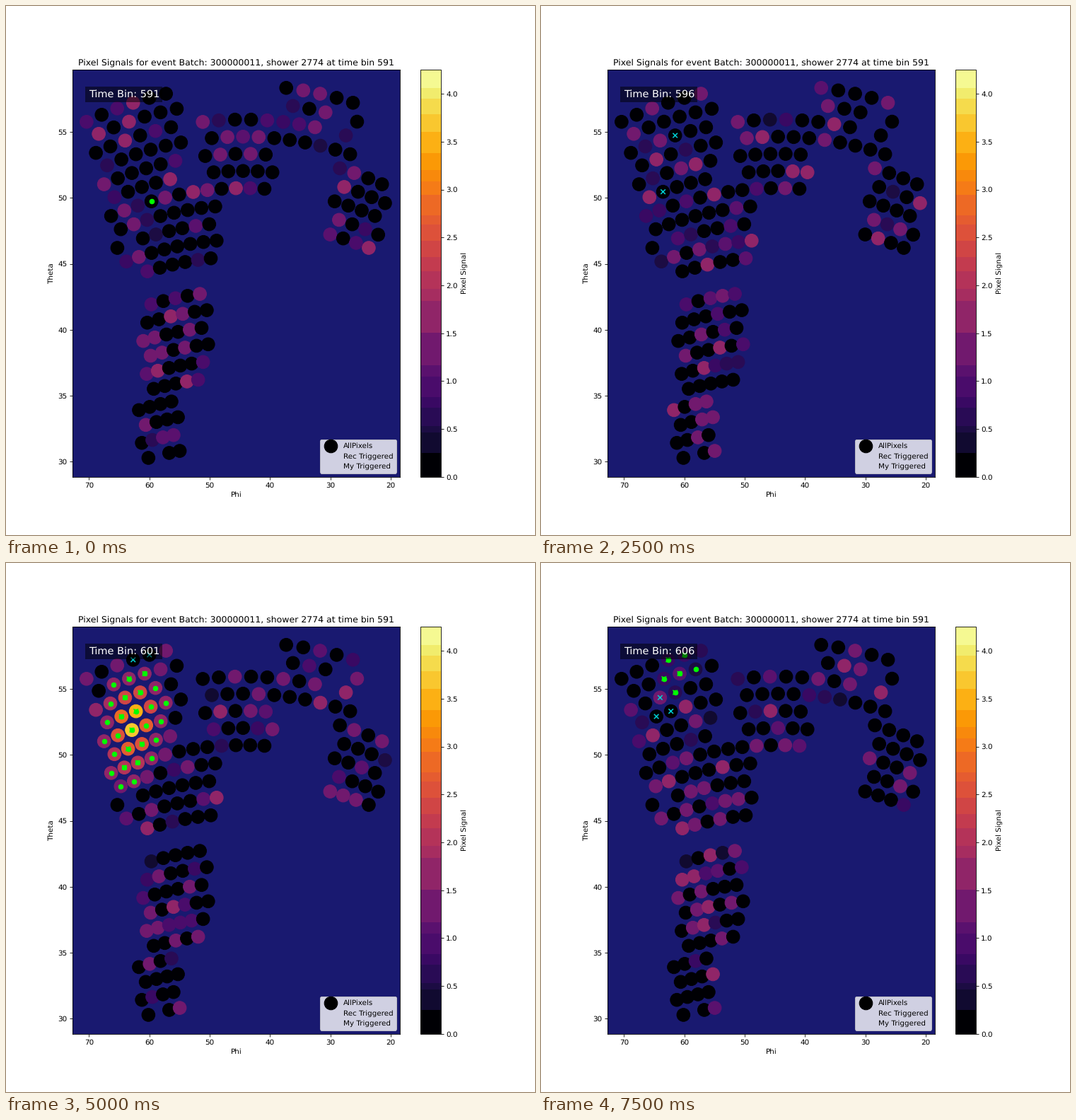
These frames come from a looping animation (748x748 px, 8000 ms). A matplotlib script:

```python
import numpy as np
import matplotlib.pyplot as plt
from matplotlib.animation import FuncAnimation
from matplotlib.colors import ListedColormap

FIRST_BIN, N_BINS = 591, 16
VMAX = 4.254
PITCH = 1.5                    # degrees between neighbouring pixels
TOP_TILT, MID_PHI = 58.53, 44.48

# Filled parts of the hexagonal camera: first row, last row, first col, last col
BLOCKS = [
    (0, 4, 4, 9), (5, 5, 5, 9), (6, 6, -2, 9), (7, 9, 2, 9), (10, 10, 2, 7),
    (12, 12, 3, 7), (13, 16, 3, 8), (17, 17, 4, 8), (18, 21, 6, 9),
    (2, 2, -5, 2), (3, 3, -7, 2), (4, 5, -2, 2),
    (0, 1, -7, -3), (2, 2, -7, -7), (4, 8, -10, -7),
]
GAPS = {(1, -6), (8, 8), (21, 8)}
EARLY_REC = (6, 6)
EARLY_MY = [(2, 6), (4, 8), (5, 8)]


def sky(row, col):
    """Phi and theta of a lattice node; each row lies on a great circle."""
    tilt = np.radians(TOP_TILT - PITCH * np.sqrt(3) / 2 * row)
    a = np.radians(PITCH * (col + np.where(row % 2, 0, .5)))
    theta = np.arcsin(np.sin(tilt) * np.cos(a))
    phi = np.arctan2(np.sin(a), np.cos(a) * np.cos(tilt))
    return MID_PHI + np.degrees(phi), np.degrees(theta)


nodes = [(r, c) for r0, r1, c0, c1 in BLOCKS
         for r in range(r0, r1 + 1) for c in range(c1, c0 - 1, -1)
         if (r, c) not in GAPS]
row, col = np.array(nodes).T
phi, theta = sky(row, col)
points = np.column_stack([phi, theta])
across = phi - (63.38 - .306 * (theta - 50.445))   # distance from the track

is_early_rec = np.array([n == EARLY_REC for n in nodes])
is_early_my = np.array([n in EARLY_MY for n in nodes])
core = (np.abs(across) < 2.145) & (row < 7)


def pulse(b):
    """Signal of the climbing shower and the pixels inside its outline."""
    keys = np.arange(596, 607, 2)
    amp = np.interp(b, keys, [0, 1.9, 4.3, 4.2, 2.7, 1.4])
    mid = np.interp(b, keys, [49, 50.2, 50.8, 53.85, 55.5, 56.5])
    wide = np.interp(b, keys, [1, 1.75, 3.75, 5.86, 4.6, 2.9])
    tall = np.interp(b, keys, [1.5, 2.6, 3.75, 4.1, 3, 2])
    r = np.hypot(across / wide, (theta - mid) / tall)
    return amp * np.exp(-.9 * r), (r < 1.25) & (amp > 1)


def signals(b):
    rng = np.random.default_rng(b)
    n = len(nodes)
    noise = rng.triangular(.25, 1.5, 1.75, n) * (rng.random(n) < .37)
    light, inside = pulse(b)
    return np.where(inside, light * rng.uniform(.94, 1.06, n), noise)


def triggers(b):
    rec = pulse(b)[1] | (is_early_rec & (b < 594))
    start = np.where(is_early_my, 595, np.where(theta > 53.7, 600, 598))
    end = np.where(theta > 52.5, 606, 603)
    return rec, core & (start <= b) & (b <= end)


def stepped_inferno():
    edges = np.array([0, .25, .465, .53, .72, .83, 1.05, 1.165, 1.5, 1.84, 1.96,
                      2.14, 2.29, 2.47, 2.63, 2.73, 2.94, 3.08, 3.21, 3.38,
                      3.61, 3.79, 3.95, 4.06, VMAX])
    mids = (edges[:-1] + edges[1:]) / 2 / VMAX
    mids[0] = 0
    v = (np.arange(512) + .5) / 512 * VMAX
    return ListedColormap(plt.get_cmap("inferno")(mids[np.digitize(v, edges) - 1]))


plt.rcParams["text.hinting"] = "none"
fig, ax = plt.subplots(figsize=(10, 10), dpi=74.8)
ax.set_facecolor("midnightblue")
ax.scatter([], [], s=320, color="black", label="AllPixels")
glow = ax.scatter(phi, theta, s=320, c=signals(FIRST_BIN), cmap=stepped_inferno(),
                  vmin=0, vmax=VMAX)
rec_dots = ax.scatter([], [], s=40, color="none", label="Rec Triggered", zorder=2)
my_marks = ax.scatter([], [], s=40, marker="x", color="none", label="My Triggered",
                      zorder=2)
fig.colorbar(glow, ax=ax, label="Pixel Signal")
ax.legend(loc="lower right")
rec_dots.set_color("lime")

ax.set_xlim(72.81, 18.445)
ax.set_ylim(28.86, 59.725)
ax.set_xlabel("Phi")
ax.set_ylabel("Theta")
ax.set_title("Pixel Signals for event Batch: 300000011, shower 2774 at time bin 591")
label = ax.text(.05, .95, "", transform=ax.transAxes, fontsize=14, color="white",
                va="top", bbox=dict(facecolor="black", alpha=.5, linewidth=0))


def update(i):
    b = FIRST_BIN + i
    rec, my = triggers(b)
    glow.set_array(signals(b))
    rec_dots.set_offsets(points[rec])
    my_marks.set_offsets(points[my])
    my_marks.set_color(["lime" if on else "darkturquoise" for on in rec[my]] or "none")
    label.set_text(f"Time Bin: {b}")
    return glow, rec_dots, my_marks, label


anim = FuncAnimation(fig, update, frames=N_BINS, interval=500, repeat=True,
                     repeat_delay=0, blit=False)
plt.show()
```
